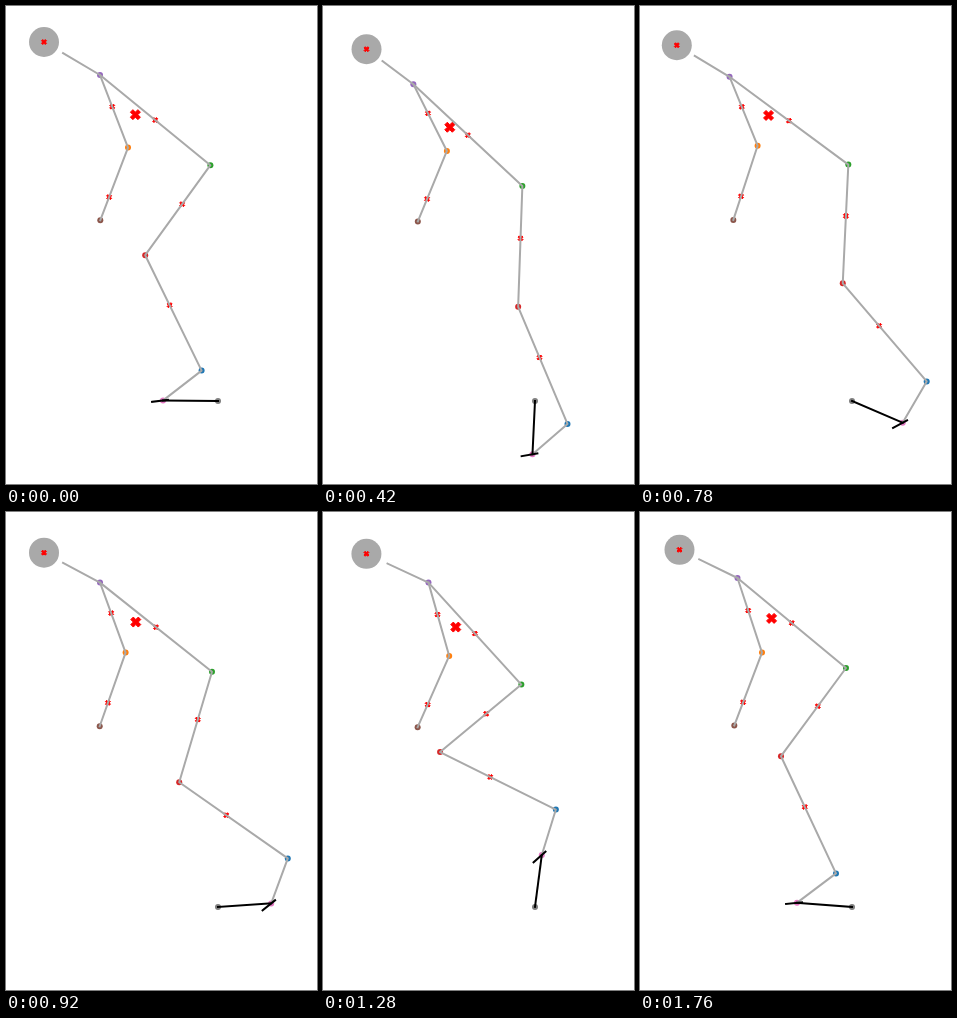
An HTML page for the animation above (1.78 s loop, 311 px wide and 478 px high).

```html
<!DOCTYPE html>
<html lang="en">
<head>
<meta charset="utf-8">
<title>Pedalling figure</title>
<style>
  html, body { margin: 0; width: 100%; height: 100%; overflow: hidden; background: #fff; }
  svg { display: block; width: 311px; height: 478px; }
  .limb, .crank { fill: none; stroke: #a9a9a9; stroke-width: 2; stroke-linejoin: round; stroke-linecap: square; }
  .crank { stroke: #000; }
  .mass { fill: #f00; stroke: #f00; stroke-linejoin: miter; }
</style>
</head>
<body>
<svg id="stage" viewBox="0 0 311 478"></svg>
<script>
const PERIOD = 1780, STEP = 20;
const AXLE = [212, 395];
const FOOT_TILT = 31 * Math.PI / 180;

// Key poses: time in ms, then x,y of each joint at those times.
const TIMES = [0, 220, 620, 920, 1120, 1460, 1760].map(t => t / PERIOD);
const POSES = {
  head:     [[38, 36], [43, 42], [39, 40], [38, 40.7], [42.4, 43], [41.2, 38.4], [39.5, 37.8]],
  shoulder: [[94, 69], [92, 77.2], [88, 74], [94, 70.6], [102, 72.3], [104.8, 65.4], [97.5, 66]],
  elbow:    [[122, 141.6], [125.4, 145.6], [119, 141.2], [119.6, 140.6], [124.6, 143.3], [124.3, 142], [122, 140.6]],
  hand:     [[94.3, 214.2], [95.3, 215.6], [93.6, 214.3], [93.7, 214.3], [94.4, 215.2], [94.4, 214.3], [94.3, 213.4]],
  hip:      [[204.4, 159.2], [198.4, 177], [205.6, 167.4], [206, 159.8], [199.2, 170.8], [203.3, 162.5], [206, 156]],
  knee:     [[139.2, 249.2], [158.5, 289.5], [218.2, 289.5], [173.2, 270.2], [134.6, 259], [116.7, 220.6], [141, 244.2]],
  ankle:    [[195.6, 364.6], [212.6, 405.4], [275.2, 403], [281.8, 346.4], [256, 311.3], [212.4, 304.7], [196, 361.4]],
  pedal:    [[157, 394.5], [174.6, 433.2], [245, 439], [265.2, 391.4], [246.4, 358.2], [186, 345.2], [157, 390.8]]
};

// Smooth motion prior: low harmonics of the pedal stroke plus a slow drift.
const HARMONICS = [100, 1, 0.15, 0.01, 0.002];
const DRIFT = 0.02, TOLERANCE = 1e-4;
const kernel = (a, b) => DRIFT * (a - 0.5) * (b - 0.5) +
  HARMONICS.reduce((sum, w, h) => sum + w * Math.cos(2 * Math.PI * h * (a - b)), 0);

function solve(matrix, values) {
  const rows = matrix.map((r, i) => [...r, values[i]]);
  const n = rows.length;
  for (let i = 0; i < n; i++) {
    for (let j = 0; j < n; j++) {
      if (j === i) continue;
      const f = rows[j][i] / rows[i][i];
      for (let k = i; k <= n; k++) rows[j][k] -= f * rows[i][k];
    }
  }
  return rows.map((r, i) => r[n] / r[i]);
}

const gram = TIMES.map((a, i) => TIMES.map((b, j) => kernel(a, b) + (i === j ? TOLERANCE : 0)));
const tracks = {};
for (const [name, points] of Object.entries(POSES)) {
  tracks[name] = [0, 1].map(axis => solve(gram, points.map(p => p[axis])));
}

function poseAt(u) {
  const basis = TIMES.map(t => kernel(u, t));
  const pose = { axle: AXLE };
  for (const name in tracks) {
    pose[name] = tracks[name].map(w => w.reduce((sum, v, i) => sum + v * basis[i], 0));
  }
  return pose;
}

const stage = document.getElementById("stage");
function add(tag, attrs) {
  const el = document.createElementNS("http://www.w3.org/2000/svg", tag);
  for (const key in attrs) el.setAttribute(key, attrs[key]);
  return stage.appendChild(el);
}

const DOT_COLORS = {
  ankle: "#1f77b4", elbow: "#ff7f0e", hip: "#2ca02c", knee: "#d62728",
  shoulder: "#9467bd", hand: "#8c564b", pedal: "#e377c2", axle: "#7f7f7f"
};
// Centre of mass of each segment: from, to, fraction along it, share of the upper body.
const SEGMENTS = [
  ["head", "head", 0, 0.081],
  ["shoulder", "hip", 0.5, 0.497],
  ["shoulder", "elbow", 0.436, 0.056],
  ["elbow", "hand", 0.682, 0.044],
  ["hip", "knee", 0.433, 0],
  ["knee", "ankle", 0.433, 0]
];
const UPPER_BODY = SEGMENTS.reduce((sum, s) => sum + s[3], 0);

const cross = size => add("path", {
  class: "mass",
  "stroke-width": 4 / size,
  d: "M-1-2 0-1 1-2 2-1 1 0 2 1 1 2 0 1-1 2-2 1-1 0-2-1Z"
});

const headDisc = add("circle", { r: 15, fill: "#a9a9a9" });
const dots = Object.entries(DOT_COLORS).map(([name, fill]) => [name, add("circle", { r: 3, fill })]);
const crosses = SEGMENTS.map(() => cross(5));
const bigCross = cross(10);
const body = add("polyline", { class: "limb" });
const arm = add("polyline", { class: "limb" });
const crank = add("polyline", { class: "crank" });
const foot = add("polyline", { class: "crank" });

const mix = (a, b, f) => [a[0] + (b[0] - a[0]) * f, a[1] + (b[1] - a[1]) * f];
const trace = (el, ...points) => el.setAttribute("points", points.join(" "));
const centre = (el, [x, y]) => { el.setAttribute("cx", x); el.setAttribute("cy", y); };
const stamp = (el, [x, y], size) => el.setAttribute("transform", `translate(${x} ${y}) scale(${size / 4})`);

function draw(ms) {
  const u = Math.floor((ms % PERIOD) / STEP) * STEP / PERIOD;
  const p = poseAt(u);

  centre(headDisc, p.head);
  for (const [name, el] of dots) centre(el, p[name]);

  const total = [0, 0];
  SEGMENTS.forEach(([from, to, f, share], i) => {
    const c = mix(p[from], p[to], f);
    stamp(crosses[i], c, 5);
    total[0] += c[0] * share / UPPER_BODY;
    total[1] += c[1] * share / UPPER_BODY;
  });
  stamp(bigCross, total, 10);

  trace(body, mix(p.shoulder, p.head, 0.66), p.shoulder, p.hip, p.knee, p.ankle, p.pedal);
  trace(arm, p.shoulder, p.elbow, p.hand);
  trace(crank, p.axle, p.pedal);

  const angle = Math.atan2(p.ankle[1] - p.pedal[1], p.ankle[0] - p.pedal[0]) + FOOT_TILT;
  const along = d => [p.pedal[0] + d * Math.cos(angle), p.pedal[1] + d * Math.sin(angle)];
  trace(foot, along(-11), along(5));
}

function tick() {
  draw(performance.now());
  requestAnimationFrame(tick);
}
draw(0);
requestAnimationFrame(tick);
</script>
</body>
</html>
```
